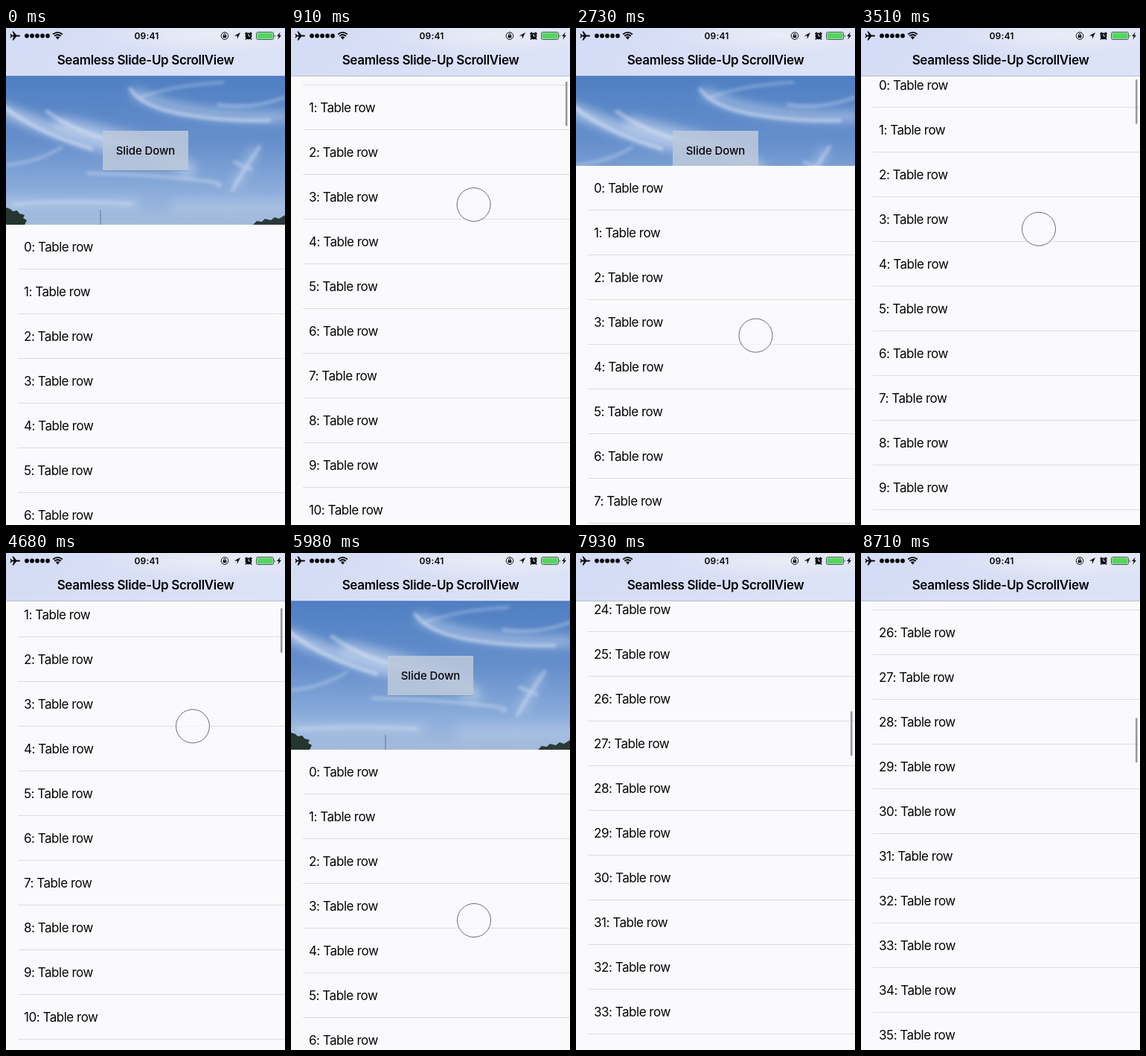
An HTML page that plays this animation: 375x667 px, repeating every 8.84 s.

```html
<!DOCTYPE html>
<html lang="en">
<head>
<meta charset="utf-8">
<title>Seamless Slide-Up ScrollView</title>
<style>
  html, body { margin: 0; width: 100%; height: 100%; overflow: hidden; background: #fafafc; }
  svg { display: block; width: 375px; height: 667px; }
  text { font-family: Inter, Roboto, sans-serif; fill: #050507; }
  .row { font-size: 17px; letter-spacing: -.48px; }
  .title { font-size: 17px; font-weight: 600; letter-spacing: -.34px; text-anchor: middle; }
  .clock { font-size: 12px; font-weight: 600; letter-spacing: .2px; text-anchor: middle; }
  .button { font-size: 15px; font-weight: 500; letter-spacing: -.1px; text-anchor: middle; }
  .clouds path { fill: none; stroke: #e6edfa; stroke-linecap: round; }
</style>
</head>
<body>
<svg viewBox="0 0 375 667">
  <defs>
    <linearGradient id="sky" x2="0" y2="1">
      <stop offset="0" stop-color="#4f7fc2"/>
      <stop offset=".45" stop-color="#668fcc"/>
      <stop offset=".8" stop-color="#8eafdc"/>
      <stop offset="1" stop-color="#a5bbdc"/>
    </linearGradient>
    <linearGradient id="bar" x2="1" y2=".15">
      <stop offset="0" stop-color="#d3dcf5"/>
      <stop offset=".55" stop-color="#d9dff6"/>
      <stop offset="1" stop-color="#dce2f7"/>
    </linearGradient>
    <radialGradient id="glow" cx=".72" cy=".15" r=".4">
      <stop offset="0" stop-color="#f0f0f5" stop-opacity=".75"/>
      <stop offset="1" stop-color="#f0f0f5" stop-opacity="0"/>
    </radialGradient>
    <filter id="soft" x="-30%" y="-60%" width="160%" height="220%"><feGaussianBlur stdDeviation="7"/></filter>
    <filter id="wispy" x="-30%" y="-60%" width="160%" height="220%"><feGaussianBlur stdDeviation="2"/></filter>
    <clipPath id="photo"><rect y="64" width="375" height="200"/></clipPath>
    <clipPath id="below"><rect y="64" width="375" height="603"/></clipPath>
  </defs>

  <g clip-path="url(#photo)">
    <rect y="64" width="375" height="200" fill="url(#sky)"/>
    <g class="clouds" filter="url(#soft)">
      <path d="M-10 108C35 125 75 143 135 158" stroke-width="17" opacity=".55"/>
      <path d="M75 128C135 143 190 150 245 190" stroke-width="20" opacity=".45"/>
      <path d="M175 88C220 110 280 120 375 119" stroke-width="14" opacity=".45"/>
      <path d="M0 236H175" stroke-width="10" opacity=".35"/>
      <path d="M230 240H375" stroke-width="18" opacity=".2"/>
      <path d="M310 210L334 165" stroke-width="11" opacity=".35"/>
    </g>
    <g class="clouds" filter="url(#wispy)">
      <path d="M-5 104Q40 140 115 162" stroke-width="5" opacity=".55"/>
      <path d="M55 112Q105 148 180 158" stroke-width="5" opacity=".5"/>
      <path d="M167 82Q185 108 245 117T355 124" stroke-width="4" opacity=".6"/>
      <path d="M182 92Q230 76 292 73" stroke-width="3" opacity=".4"/>
      <path d="M285 103Q330 110 375 93" stroke-width="4" opacity=".4"/>
      <path d="M0 184Q40 181 75 160" stroke-width="4" opacity=".35"/>
      <path d="M110 195Q180 196 240 202T285 212" stroke-width="4" opacity=".4"/>
      <path d="M304 218Q320 190 341 159M307 180L330 190" stroke-width="4" opacity=".45"/>
      <path d="M10 237Q80 230 168 236" stroke-width="4" opacity=".35"/>
    </g>
    <path d="M127 244V264" stroke="#62738e"/>
    <path d="M0 241l6 2 3 3 6-1 3 4 7 2-2 4 5 3-3 6H0Z" fill="#25352f"/>
    <path d="M332 264l5-5 7 1 4-4 8 2 5-4 6 2 8-5V264Z" fill="#2b3937"/>
    <rect x="130" y="139" width="115" height="53" fill="#40587d" opacity=".3"/>
    <rect x="130" y="138" width="115" height="53" fill="#c3cfe1" opacity=".83"/>
    <text class="button" x="187.5" y="169.5">Slide Down</text>
  </g>

  <g clip-path="url(#below)">
    <g id="table"><rect width="375" height="3200" fill="#fafafc"/></g>
  </g>
  <rect id="thumb" x="369" width="2.5" height="60" rx="1.25" fill="#94949f"/>

  <rect width="375" height="64" fill="url(#bar)"/>
  <rect width="375" height="64" fill="url(#glow)"/>
  <rect id="hairline" y="64" width="375" height="1" fill="#b9bdc9"/>
  <text class="title" x="187.5" y="48.5">Seamless Slide-Up ScrollView</text>

  <g fill="#08080c">
    <path d="M19 10.5q0-1-1.5-1H14L10 4.5H8.5L10.5 9.5H8L6.5 7.7H5.5L6.5 10.5 5.5 13.3H6.5L8 11.5H10.5L8.5 16.5H10L14 11.5H17.5Q19 11.5 19 10.5Z"/>
    <g id="signal"></g>
    <path d="M69.5 15.5L66.8 12.3Q69.5 10 72.2 12.3Z"/>
    <path d="M65.2 10.7Q69.5 7.2 73.8 10.7M63.2 8.5Q69.5 3.2 75.8 8.5" fill="none" stroke="#08080c" stroke-width="1.8"/>
    <circle cx="294" cy="10.5" r="4.8" fill="none" stroke="#08080c"/>
    <path d="M291.7 9.8h4.6v3.3h-4.6Z"/>
    <path d="M292.7 10V8.9a1.3 1.3 0 0 1 2.6 0V10" fill="none" stroke="#08080c" stroke-width=".9"/>
    <path d="M315 6L306.8 10.5H310.8V14.7Z"/>
    <circle cx="326" cy="10.8" r="4.4"/>
    <path d="M321.4 8.2l2.5-2.3M330.6 8.2l-2.5-2.3M323 14l-1 1.5M329 14l1 1.5" stroke="#08080c" stroke-width="1.6"/>
    <path d="M326 8V11H328.4" fill="none" stroke="#e3e6f5"/>
    <rect x="336.5" y="5.5" width="23" height="10" rx="2" fill="none" stroke="#30363b" stroke-width=".8"/>
    <rect x="337.5" y="6.5" width="21" height="8" rx="1" fill="#52d65d"/>
    <path d="M360.8 8.5q1.4 2 0 4Z"/>
    <path d="M368.8 5.5L364 11H366.7L365.3 15.5L370 9.7H367.3Z"/>
  </g>
  <text class="clock" x="189" y="14.8">09:41</text>

  <circle id="touch" r="22.5" fill="#fbfbfd" fill-opacity=".7" stroke="#6c6c70"/>
</svg>
<script>
const LOOP = 8840, STEP = 130;
const NAV = 64, ROW = 60, RELEASE = 6640;
const byId = id => document.getElementById(id);
const [table, thumb, hairline, touch] = ['table', 'thumb', 'hairline', 'touch'].map(byId);

function add(parent, tag, attrs, label = '') {
  const el = document.createElementNS('http://www.w3.org/2000/svg', tag);
  for (const name in attrs) el.setAttribute(name, attrs[name]);
  el.textContent = label;
  parent.append(el);
}
for (let i = 0; i < 50; i++) {
  add(table, 'text', { class: 'row', x: 24, y: i * ROW + 36 }, `${i}: Table row`);
  add(table, 'rect', { x: 16, y: (i + 1) * ROW - 1, width: 359, height: 1, fill: '#dddde1' });
}
for (let i = 0; i < 5; i++) add(byId('signal'), 'circle', { cx: 28 + i * 7, cy: 10.5, r: 2.9 });

// Drag: time in ms, top of the table, speed in px per ms
const drag = [
  [0, 264, 0], [260, 264, 0], [900, 20, -.3], [1500, -100, 0], [1950, -17, .2],
  [2700, 185, 0], [3510, 47, -.2], [4150, -75, 0], [4680, -7, .33],
  [5400, 262, 0], [5850, 264, 0], [6370, 264, 0], [RELEASE, -15, -2.98]
];
const fingerX = [[0, 247], [1950, 244], [3510, 239], [4680, 251], [5980, 246], [6370, 246], [RELEASE, 255]];

function segment(keys, t) {
  const i = Math.max(1, keys.findIndex(key => key[0] >= t));
  const a = keys[i - 1], b = keys[i];
  return { a, b, span: b[0] - a[0], u: (t - a[0]) / (b[0] - a[0]) };
}
function dragTop(t) {
  const { a, b, span, u } = segment(drag, Math.min(t, RELEASE));
  const w = 1 - u;
  return w * w * ((1 + 2 * u) * a[1] + u * span * a[2])
       + u * u * ((3 - 2 * u) * b[1] - w * span * b[2]);
}
// After the flick the list coasts to rest exponentially
const coastTop = t => NAV - 1571 + 538 * Math.exp((7150 - t) / 500);
const tableTop = t => t < RELEASE ? dragTop(t) : coastTop(t);

function render() {
  const t = Math.floor(performance.now() % LOOP / STEP) * STEP;
  const top = Math.round(tableTop(t));
  const offset = NAV - top;
  table.setAttribute('transform', `translate(0 ${top})`);
  thumb.setAttribute('y', 67 + offset * .0997);
  thumb.style.opacity = offset > 0 ? 1 : 0;
  hairline.style.opacity = offset > 0 ? 1 : .25;

  const touching = t > 0 && t < RELEASE;
  touch.style.display = touching ? '' : 'none';
  if (touching) {
    const { a, b, u } = segment(fingerX, t);
    // The list trails the finger slightly
    touch.setAttribute('cx', a[1] + (b[1] - a[1]) * u);
    touch.setAttribute('cy', dragTop(t + 30) + 229);
  }
  requestAnimationFrame(render);
}
render();
</script>
</body>
</html>
```
